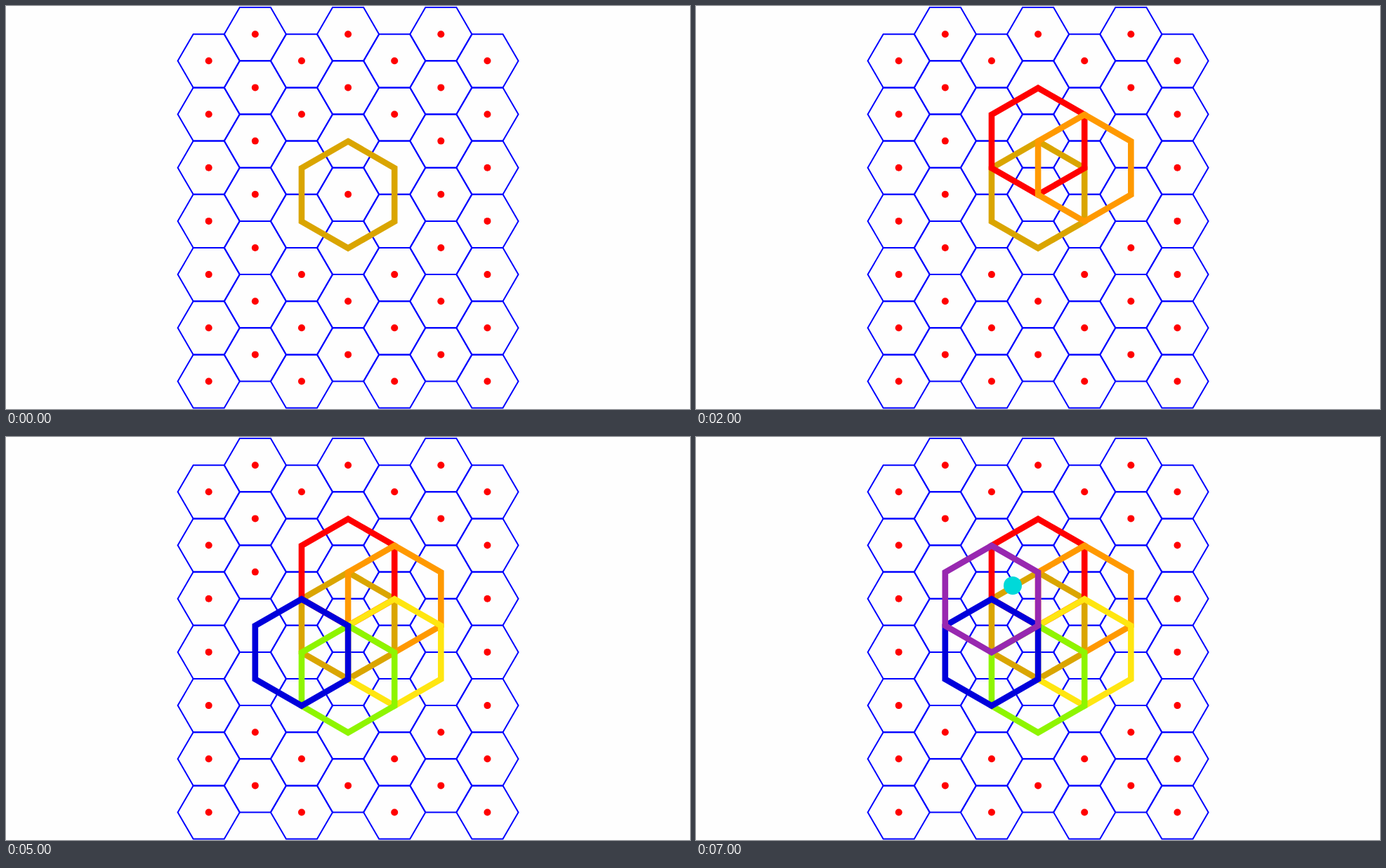
Animation, 974 px wide and 575 px high, one loop 8 s. Source, as an HTML page:

```html
<!DOCTYPE html>
<html lang="en">
<head>
<meta charset="utf-8">
<title>Hexagon rings</title>
<style>
html, body { margin: 0; width: 100%; height: 100%; overflow: hidden; background: #fefefe; }
svg { display: block; width: 974px; height: 575px; }
.cell { fill: none; stroke: #00f; stroke-width: 2; }
.dot { fill: #f00; }
.ring { fill: none; stroke-width: 8.6; }
.timed { animation: 8s step-end infinite; }
</style>
</head>
<body>
<svg id="stage" viewBox="0 0 974 575"></svg>
<script>
const STEPS = 8;
const PITCH_X = 66.13;
const PITCH_Y = 76.2; // also the radius of a ring
const LEFT = 288.7;
const TOP = 40.2;
const MID = { x: LEFT + 3 * PITCH_X, y: TOP + 3 * PITCH_Y };
const COLORS = ['#daa500', '#f00', '#ff9900', '#ffe611', '#8ef500', '#0000db', '#9828b0'];
const stage = document.getElementById('stage');

// The first ring sits in the middle, the others go clockwise around it.
const rings = COLORS.map((color, i) => ({ color, ...(i ? around(MID, i - 1) : MID) }));

// Neighbouring cell centre, k sixths of a turn clockwise from the top.
function around({ x, y }, k) {
  const a = k * Math.PI / 3;
  return {
    x: x + PITCH_X * Math.sin(a) / Math.sin(Math.PI / 3),
    y: y - PITCH_Y * Math.cos(a)
  };
}

function add(tag, attrs) {
  const el = document.createElementNS('http://www.w3.org/2000/svg', tag);
  for (const key in attrs) el.setAttribute(key, attrs[key]);
  return stage.appendChild(el);
}

function hexagon(attrs, corner) {
  const points = Array.from({ length: 6 }, (_, k) => corner(k)).join(' ');
  return add('polygon', { ...attrs, points });
}

function timed(el, name) {
  el.classList.add('timed');
  el.style.animationName = name;
}

// One pair of keyframes per step: appear at it, or vanish at it.
function addKeyframes() {
  const rule = (name, step, before, after) =>
    `@keyframes ${name}${step} { 0% { visibility: ${step ? before : after}; }
      ${step * 100 / STEPS}%, 100% { visibility: ${after}; } }\n`;
  let css = '';
  for (let i = 0; i < STEPS; i++) {
    css += rule('show', i, 'hidden', 'visible') + rule('hide', i, 'visible', 'hidden');
  }
  const style = document.createElement('style');
  style.textContent = css;
  document.head.append(style);
}

function drawCell({ x, y }) {
  const r = PITCH_X * 2 / 3;
  hexagon({ class: 'cell' }, k => {
    const a = k * Math.PI / 3;
    return [x + r * Math.cos(a), y + PITCH_Y / Math.sqrt(3) * Math.sin(a)];
  });
}

// A dot vanishes under the first ring that has a corner on it.
function drawDot({ x, y }) {
  const dot = add('circle', { class: 'dot', cx: x, cy: y, r: 5 });
  const cover = rings.findIndex(c => Math.abs(Math.hypot(c.x - x, c.y - y) - PITCH_Y) < 3);
  if (cover >= 0) timed(dot, 'hide' + cover);
}

function drawRing(ring, step) {
  const el = hexagon({ class: 'ring', stroke: ring.color }, k => {
    const { x, y } = around(ring, k);
    return [x, y + 0.5];
  });
  timed(el, 'show' + step);
}

const cells = [];
for (let col = 0; col < 7; col++) {
  for (let row = 0; row < 7; row++) {
    const shift = col % 2 ? 0 : 0.5;
    cells.push({ x: LEFT + col * PITCH_X, y: TOP + (row + shift) * PITCH_Y });
  }
}

addKeyframes();
cells.forEach(drawCell);
cells.forEach(drawDot);
rings.forEach(drawRing);
timed(add('circle', { cx: 451, cy: 212, r: 13, fill: '#00d9d9' }), 'show7');
</script>
</body>
</html>
```
